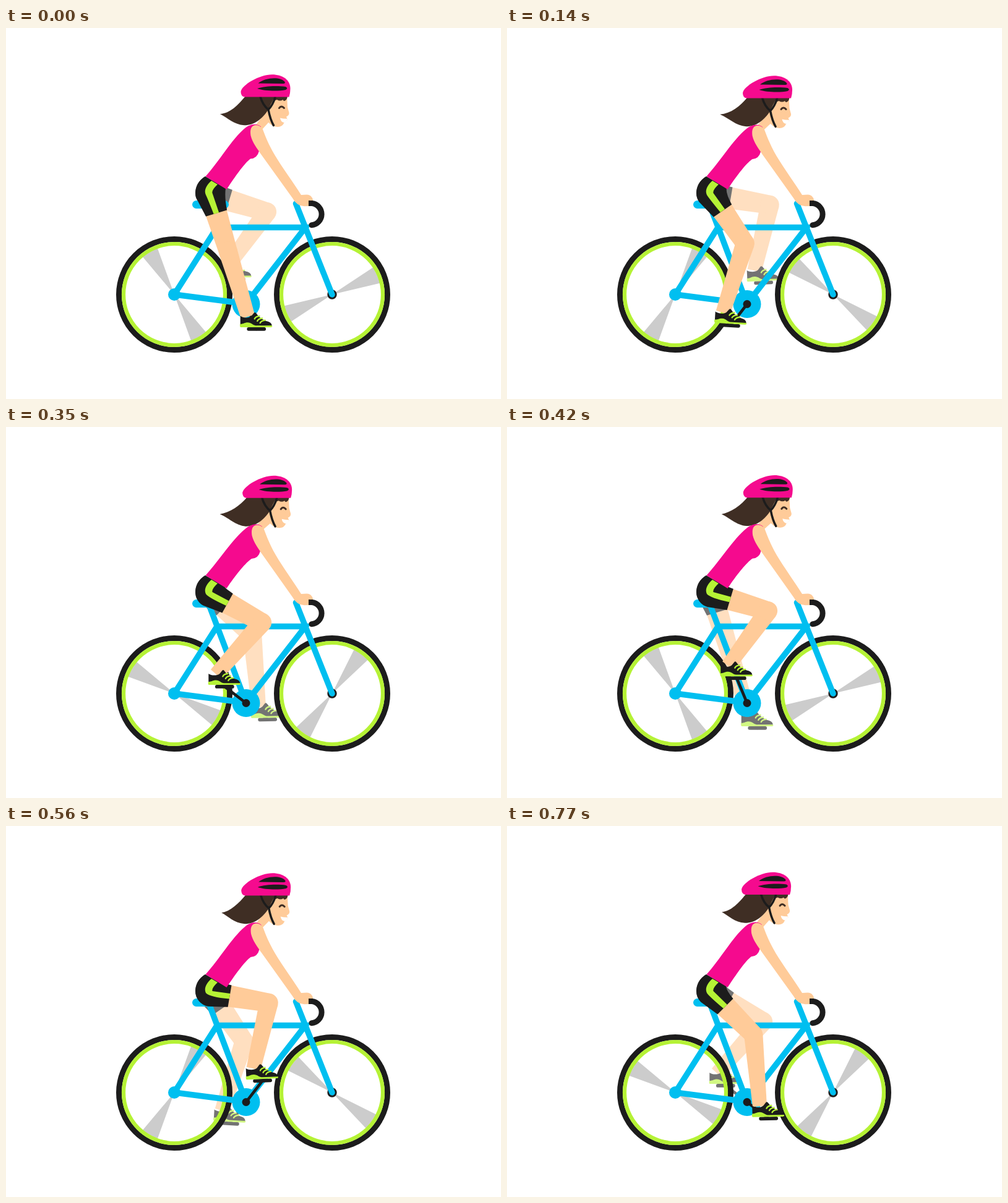
An HTML page for the animation above (0.84 s loop, 800x600 px).

```html
<!DOCTYPE html>
<html lang="en">
<head>
<meta charset="utf-8">
<title>Cyclist</title>
<style>
  html, body { margin: 0; width: 100%; height: 100%; overflow: hidden; background: #fff; }
  svg { display: block; width: 100vw; height: 100vh; }
  .line { fill: none; stroke-linecap: round; }
  .ink { fill: #1c1c1c; }
  .lime { fill: #b5f235; }
  .skin { fill: #ffcb99; }
  .pink { fill: #f50a8e; }
  .hair { fill: #3f2e24; }
  .blue { fill: #00bff0; }
  .inkLine { stroke: #1c1c1c; }
  .limeLine { stroke: #b5f235; }
  .blueLine { stroke: #00bff0; }
</style>
</head>
<body>
<svg viewBox="0 0 800 600" xmlns="http://www.w3.org/2000/svg">
  <defs>
    <g id="shoe">
      <path class="ink" d="M-26-21C-22-18-13-17-8-21L-4-26Q-2-28 0-25C5-18 11-14 19-12Q25-10 25-5H-26Z"/>
      <path class="lime" d="M-26.5-8C-20-8-20-10.5-14-10.5C-8-10.5-6-6-1-5.6H25.3Q26.5-3 23-2.8H-25.5Q-27-3-26.5-8Z"/>
      <path class="line limeLine" stroke-width="2.3" d="M-3-16.5q2-4 8-4.500M1.500-13q2-4 8-4.500M6-9.800q2-4 8-4.500"/>
    </g>
    <g id="wheel">
      <circle class="line inkLine" r="89.5" stroke-width="9"/>
      <circle class="line limeLine" r="82" stroke-width="6.2"/>
    </g>
    <path id="spokes" fill="#ccc" d="M0 0L79-14V14ZL-79-14V14Z"/>
  </defs>

  <g opacity=".61">
    <g id="farCrank"></g>
    <g id="farLeg"></g>
  </g>

  <use href="#spokes" id="rearSpokes"/>
  <use href="#spokes" id="frontSpokes"/>
  <use href="#wheel" x="272" y="431"/>
  <use href="#wheel" x="527" y="431"/>
  <circle class="ink" cx="527" cy="431" r="7.7"/>
  <path class="line blueLine" stroke-width="9.5" d="M329 290L388 446L272 431L341 322.500H484L388 446M468.500 284L527 431"/>
  <path class="line blueLine" stroke-width="13" d="M307.500 285.500H353.500"/>
  <circle class="blue" cx="272" cy="431" r="10"/>
  <circle class="blue" cx="388" cy="446.500" r="22.5"/>

  <g id="nearCrank"></g>
  <g id="nearLeg"></g>

  <path class="skin" id="neck"/>
  <path class="hair" id="hair"/>
  <path class="pink" id="shirt"/>
  <g id="head">
    <path class="skin" d="M424 131L436 108H454L455 128L457.500 137Q458 141 453 143.500L455 148L449.500 153Q447 160 439 160Q431 160 424 152.500Z"/>
    <path fill="#fff" d="M443 145.500Q448 147 455.500 146.800Q453 151.500 449.500 153Q444 152 443 145.500Z"/>
    <path class="line" stroke="#3f2e24" stroke-width="3" d="M441.500 129.500Q445 124.500 449.500 129.500"/>
    <path class="hair" d="M433 109H455Q455 116 450 118Q448 118 447.500 116Q443 119 438 116L432 118Z"/>
    <path class="line inkLine" stroke-width="3.5" d="M411 111Q415 125 424 132Q427 148 432.500 157.500M435 112Q431 125 424 132"/>
    <path class="pink" d="M385 111.500Q379.500 110 379.500 103C381 92 410 75.300 430 75.300C447 75.300 459.500 84 459.500 98Q459.500 106 457.500 111.500Z"/>
    <path class="ink" d="M407.500 89.500C419 79.500 444 78.500 450.500 87Q452 90 448 90Z"/>
    <path class="ink" d="M406 98C418 93.300 440 93.300 452 95Q456.500 97.500 452 100C440 102.500 418 102 406 98Z"/>
  </g>
  <path class="skin" id="arm"/>
  <path class="line inkLine" stroke-width="9" d="M494 318.700A17.700 17.700 0 0 0 494.500 283.500"/>
  <path class="ink" d="M489 279H496V288H489Z"/>
</svg>
<script>
const $ = id => document.getElementById(id);
const rad = Math.PI / 180;
const STEP = 70, STEPS = 12;
const HIP = [331, 270], AXLE = [388, 446.5];

// Thigh direction and foot tilt, in degrees, through one pedal turn
const thigh = [73, 62, 55.5, 49.3, 39, 29, 16.7, 8, 9.6, 18.2, 31, 45];
const tilt = [0, 2.5, 3.5, 12, 7, 0, 0, 0, -2.5, -10, -6, -1];

const add = (p, v, s) => [p[0] + v[0] * s, p[1] + v[1] * s];
const dir = a => [Math.cos(a * rad), Math.sin(a * rad)];
const pt = p => p[0].toFixed(2) + ' ' + p[1].toFixed(2);
const poly = (...ps) => 'M' + ps.map(pt).join('L') + 'Z';

function taper(a, b, wa, wb) {
  const d = Math.hypot(b[0] - a[0], b[1] - a[1]);
  const n = [(a[1] - b[1]) / d, (b[0] - a[0]) / d];
  return poly(add(a, n, wa), add(b, n, wb), add(b, n, -wb), add(a, n, -wa));
}

function shorts(u, n, striped) {
  const end = add(HIP, u, 31);
  const low = add(end, n, 17.8), high = add(end, n, -17.8);
  const bend = add(add(HIP, u, 10), n, -20);
  let s = `<path class="ink" d="M322 240C312 246 306 256 306 267A25 25 0 0 0 ${pt(add([331, 267], n, 25))}
    L${pt(low)}L${pt(high)}Q${pt(bend)} 355 259Z"/>`;
  if (striped) {
    s += `<path class="lime" d="M332 247C322 256 320 264 323 270Q${pt(add(HIP, n, 7))} ${pt(add(end, n, 4.5))}
      L${pt(add(end, n, -4.3))}L333.5 267Q332 262 342 253Z"/>`;
  }
  return s;
}

function drawSide(name, k, near) {
  const a = 67.5 + 30 * k, t = tilt[k];
  const pedal = add(AXLE, dir(a), 43.7);
  const fx = dir(t), fy = dir(t + 90);
  const ankle = add(add(pedal, fx, -13.8), fy, -20);
  const u = dir(thigh[k]), n = dir(thigh[k] + 90);
  const knee = add(HIP, u, 95);
  const place = `transform="translate(${pt(pedal)}) rotate(${t})"`;

  $(name + 'Crank').innerHTML =
    `<path class="line inkLine" stroke-width="4.6" d="M${pt(AXLE)}L${pt(pedal)}"/>
     <circle class="ink" cx="${AXLE[0]}" cy="${AXLE[1]}" r="6.5"/>
     <path class="line inkLine" stroke-width="5.8" d="M-12.5 0H12.500" ${place}/>`;

  $(name + 'Leg').innerHTML =
    `<path class="skin" d="${taper(add(HIP, u, 28), knee, 17.6, 15)}"/>
     <path class="skin" d="${taper(knee, ankle, 15.2, 11.5)}"/>
     <circle class="skin" cx="${knee[0]}" cy="${knee[1]}" r="15.1"/>
     <use href="#shoe" ${place}/>` + shorts(u, n, near);
}

function drawBody(k) {
  const bob = 1.41 - 2 * Math.cos(30 * (k + 1.5) * rad);
  const hx = bob * .8, hy = bob;
  const sx = bob * .6, sy = bob * .45;
  const h = (x, y) => pt([x + hx, y + hy]);
  const s = (x, y, f = 1) => pt([x + sx * f, y + sy * f]);
  const tip = pt([346.3 - 2.2 * Math.cos(30 * (k - 2.7) * rad), 140 - Math.cos(30 * (k + .5) * rad)]);

  $('head').setAttribute('transform', `translate(${h(0, 0)})`);
  $('neck').setAttribute('d', `M${h(424, 130)}L${h(434, 150)}L${h(424, 153)}L${s(414, 164)}L${s(402, 159)}Z`);
  $('hair').setAttribute('d', `M${tip}C362 138 ${h(375, 125)} ${h(388, 109)}L${h(436, 109)}
    Q${h(433, 123)} ${h(424, 132)}C${h(414, 147)} ${h(402, 157.3)} ${h(385, 157.3)}C${h(368, 156)} 359 146 ${tip}Z`);
  $('shirt').setAttribute('d', `M322.5 240C345 215 ${s(365, 180, .7)} ${s(385, 163)}
    C${s(393, 156)} ${s(404, 152.5)} ${s(412, 159.5)}L${s(411, 188)}L${s(409, 199)}
    Q${s(406, 211)} ${s(395, 211.5)}C${s(385, 219, .7)} 370 241 356.5 261Z`);
  $('arm').setAttribute('d', `M${s(404, 157)}C${s(396, 157)} ${s(394, 165)} ${s(395.5, 174)}
    C${s(398, 185)} ${s(406, 195)} ${s(412, 204, .8)}L463 275Q470 288 482 288.300L491 288
    C499 285 498 270 486 269.500L477 270C460 243 ${s(437, 213, .6)} ${s(427, 192, .8)}
    C${s(421, 180)} ${s(418, 172)} ${s(415, 164)}Q${s(411, 157)} ${s(404, 157)}Z`);
}

function draw(k) {
  drawSide('far', (k + 6) % STEPS, false);
  drawSide('near', k, true);
  drawBody(k);
  $('rearSpokes').setAttribute('transform', `translate(272 431) rotate(${60 + 30 * k})`);
  $('frontSpokes').setAttribute('transform', `translate(527 431) rotate(${30 * k - 23.4})`);
}

let shown = 0;
const start = performance.now();
function tick() {
  const k = Math.floor((performance.now() - start) / STEP) % STEPS;
  if (k !== shown) draw(shown = k);
  requestAnimationFrame(tick);
}
draw(0);
requestAnimationFrame(tick);
</script>
</body>
</html>
```
